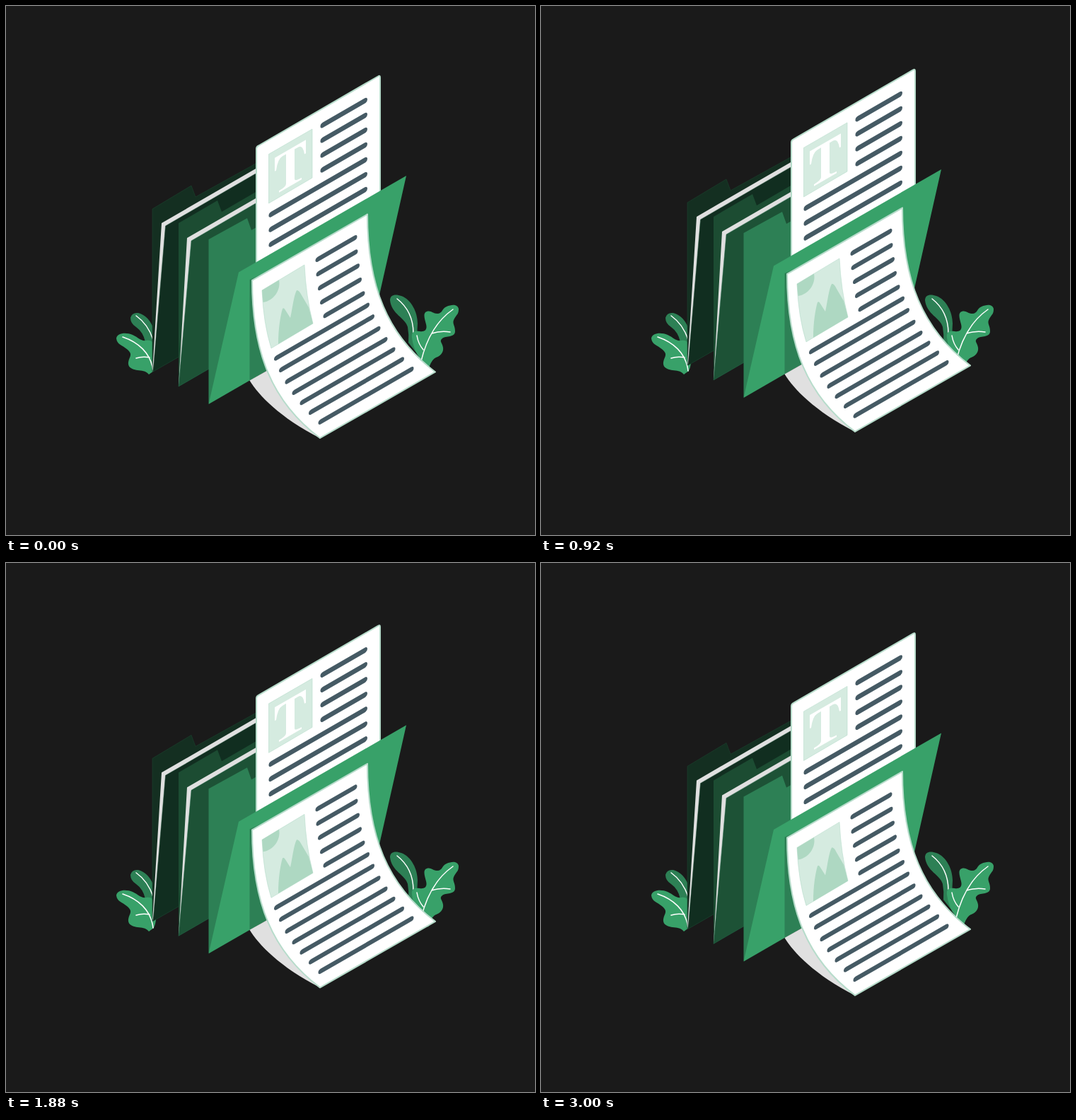
An HTML page for the animation above (3.04 s loop, 748 px wide and 748 px high).

```html
<!DOCTYPE html>
<html lang="en">
<head>
<meta charset="utf-8">
<title>Floating folders</title>
<style>
html, body { margin: 0; width: 100%; height: 100%; overflow: hidden; background: #1a1a1a; }
svg { display: block; width: 100vw; height: 100vh; }
.dark { fill: #2d8055; }
.light { fill: #38a169; }
.vein { fill: none; stroke: #fff; stroke-width: 1.5; stroke-linecap: round; }
.sheet { fill: #fff; stroke: #b7dccb; stroke-width: 2; stroke-linejoin: round; }
.edge { fill: #e0e0e0; }
.bar { fill: #455a64; }
.mint { fill: #d5ebe0; }
.hill { fill: #aed8c2; }
</style>
</head>
<body>
<svg viewBox="0 0 748 748">
  <!-- plants -->
  <path class="dark" d="M176 441Q178 433 187 434Q202 438 209 457L210 480L197 475Q194 461 184 454Q176 449 176 441Z"/>
  <path class="vein" d="M184 438Q201 450 208 472"/>
  <path class="light" d="M156 470C157 462 170 461 179 465S190 474 198 473S209 474 210 488Q215 502 209 516L202 521C197 515 192 516 186 515S172 512 173 504S180 493 172 486S157 479 156 470Z"/>
  <path class="vein" d="M165 468C186 475 205 490 208 516M184 498Q193 495 203 497"/>
  <path class="dark" d="M543 416C543 408 551 407 559 410C573 415 582 433 582 449L580 490L569 476Q570 465 568 454C565 441 545 436 543 416Z"/>
  <path class="vein" d="M553 414Q576 432 576 463"/>
  <path class="light" d="M640 428C638 421 630 422 623 425S617 435 610 435S601 430 595 432S592 442 594 450S592 461 585 460S573 460 574 469S578 486 581 492L597 515Q601 500 608 497C614 495 619 490 618 483S612 474 617 470S635 469 635 460S630 449 634 442S640 436 640 428Z"/>
  <path class="vein" d="M632 429Q599 452 587 502M602 463Q614 459 628 461M581 466Q583 478 590 486"/>

  <g id="float">
    <!-- rear folders -->
    <path fill="#142f21" stroke="#1b4530" stroke-width=".6" d="M207 287L262 254L268 270L360 219V430L207 517Z"/>
    <path class="edge" d="M220 307L360 226V260L240 400L207 517Z"/>
    <path fill="#112e20" stroke="#1d4d34" stroke-width=".5" d="M225.500 311L360 233V430L208 517Z"/>
    <path fill="#1c4c32" d="M244 307L299 275L305 291L360 259V470L244 538Z"/>
    <path class="edge" d="M256 328L360 268V300L270 400L244 538Z"/>
    <path fill="#1d5236" stroke="#27694a" stroke-width=".5" d="M262 332L360 275V471L244 538Z"/>
    <path class="dark" d="M286.500 330L341 300L347 317L370 304V500L286.500 562Z"/>

    <!-- upright sheet -->
    <path class="sheet" d="M354 400V202Q354 199 357 197.500L526 99.500Q529 97.500 529 101V300Z"/>
    <path class="mint" stroke="#b7dccb" stroke-width=".6" d="M371.500 209.500L433 174V243L371.500 279Z"/>
    <path fill="#fff" transform="matrix(1 -.577 0 1 402 202)" d="M-22 0H22V19H20Q18 4 11 4H6V46Q6 50 16 50V52.500H-16V50Q-6 50 -6 46V4H-11Q-18 4 -20 19H-22Z"/>
    <g id="upright" class="bar"></g>

    <!-- open folder and curled sheet -->
    <path class="light" d="M329 376.500L566 240L524 426L286.500 563Z"/>
    <path class="dark" d="M344.500 387L360 380L385 506L344.500 529.500Z"/>
    <path class="edge" d="M344.500 529.500L372 514L444 611C387 582 357 550 344.500 529.500Z"/>
    <path class="sheet" d="M348 388L511 294.500C511 396 539 466 607 517.500L444 611C376 560 348 490 348 388Z"/>
    <path class="mint" stroke="#b7dccb" stroke-width=".6" d="M362 402L422 366Q424 410 434 449L375 484Q364 449 362 402Z"/>
    <path class="hill" d="M362 402L386 387.500C389 402 378 417 363.500 419Z"/>
    <path class="hill" d="M385 478C385 456 388 438 391 428Q393 426 395 430L402 441C405 428 407 409 411 402Q414 401 418 409L428 426Q431 437 434 449Z"/>
    <g id="curled" class="bar"></g>
  </g>
</svg>
<script>
const SLOPE = 0.577, LOOP = 3040, LEAD = 40, RISE = 15;

// A slanted bar whose middle line starts at x, y.
function addBar(id, x, y, width, height) {
  const bar = document.createElementNS("http://www.w3.org/2000/svg", "rect");
  const attrs = {
    y: -height / 2, width, height, rx: 3.6,
    transform: `matrix(1 ${-SLOPE} 0 1 ${x} ${y})`
  };
  for (const key in attrs) bar.setAttribute(key, attrs[key]);
  document.getElementById(id).append(bar);
}

for (let i = 0; i < 7; i++) {
  const width = i < 4 ? 66.5 : 139.5;
  addBar("upright", 511 - width, 132 + 21 * i + width * SLOPE, width, 7.5);
}

const shortBars = [[437.5, 360], [438.5, 380.3], [441, 400.2], [444, 420], [448.5, 439.3]];
const longBars = [[379, 499.5], [386, 516], [394.5, 532.7], [404.5, 548], [415.5, 562.3], [428, 576.2], [441.5, 589.8]];
shortBars.forEach(([x, y]) => addBar("curled", x, y, 59, 7));
longBars.forEach(([x, y]) => addBar("curled", x, y, 135, 7));

const group = document.getElementById("float");
const lift = phase => RISE * (1 - Math.abs(1 - 2 * phase));
const base = lift(LEAD / LOOP);
const start = performance.now();

function draw(now) {
  const t = Math.max(0, now - start);
  const phase = ((t + LEAD) % LOOP) / LOOP;
  group.setAttribute("transform", `translate(0 ${base - lift(phase)})`);
  requestAnimationFrame(draw);
}
draw(start);
</script>
</body>
</html>
```
